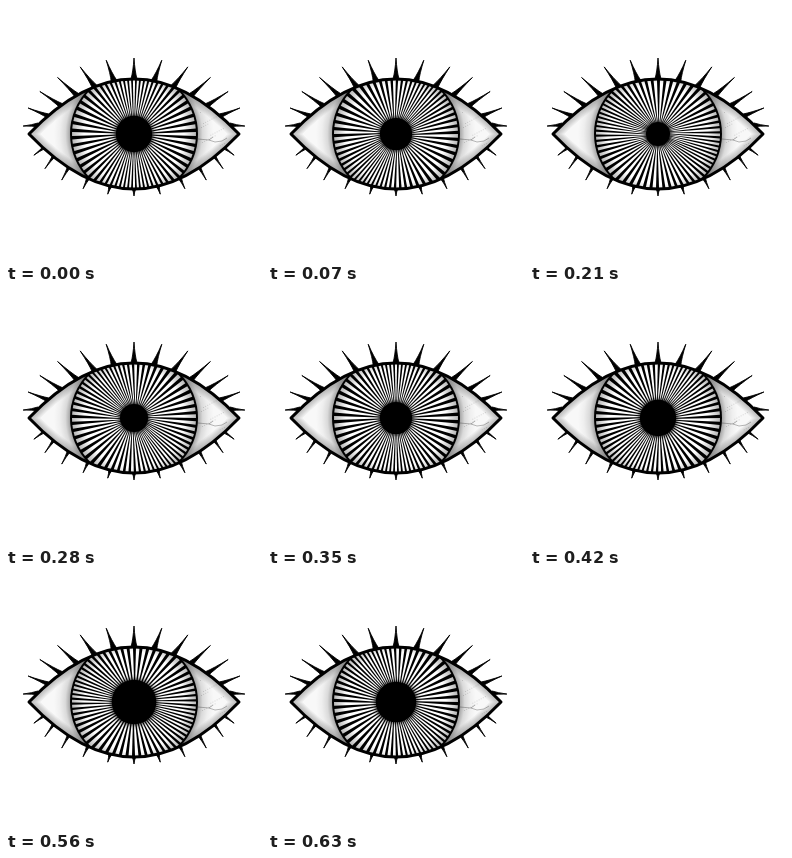
Write an HTML page with a canvas that moves like this. It is 256x256 px and loops after 700 ms.

```html
<!DOCTYPE html>
<html lang="en">
<head>
<meta charset="utf-8">
<title>Eye</title>
<style>
  html, body { margin: 0; width: 100%; height: 100%; overflow: hidden; background: #fff; }
  canvas { display: block; }
</style>
</head>
<body>
<canvas id="stage" width="256" height="256"></canvas>
<script>
const ctx = document.getElementById('stage').getContext('2d');
const TAU = Math.PI * 2, DEG = TAU / 360, C = 128;
const STEP = 70, STEPS = 10;
const HALF_W = 105, HALF_H = 55;
const RAYS = 64, IRIS = 63, HUB = 9;

const lids = new Path2D('M23 128Q128 18 233 128Q128 238 23 128Z');
const vein = new Path2D('M192 133L203 134 209 136 216 135 221 132M203 134L207 131');

const lidHeight = x => HALF_H * (1 - (x / HALF_W) ** 2);

function disc(r, fill) {
  ctx.fillStyle = fill;
  ctx.beginPath();
  ctx.arc(C, C, r, 0, TAU);
  ctx.fill();
}

function radial(r0, r1, ...alphas) {
  const fade = ctx.createRadialGradient(C, C, r0, C, C, r1);
  alphas.forEach((a, i) => fade.addColorStop(i / (alphas.length - 1), `rgba(0,0,0,${a})`));
  return fade;
}

// A spike with a broad foot that narrows quickly
function spike(rx, ry, tx, ty, w) {
  const len = Math.hypot(tx - rx, ty - ry);
  const nx = (ry - ty) / len * w, ny = (tx - rx) / len * w;
  const mx = rx * .65 + tx * .35, my = ry * .65 + ty * .35;
  ctx.beginPath();
  ctx.moveTo(rx + nx, ry + ny);
  ctx.quadraticCurveTo(mx + nx * .3, my + ny * .3, tx, ty);
  ctx.quadraticCurveTo(mx - nx * .3, my - ny * .3, rx - nx, ry - ny);
  ctx.fill();
  ctx.stroke();
}

// Roots follow the lid, tips follow a wider ellipse; side is -1 above, 1 below
function lashRow(side, count, root, spread, tipW, tipH, width) {
  for (let k = -count; k <= count; k++) {
    const x = root * Math.sin(k * spread * DEG);
    spike(C + x, C + side * lidHeight(x),
      C + tipW * Math.sin(k * 14.5 * DEG), C + side * tipH * Math.cos(k * 14 * DEG),
      width * (1 - Math.abs(k) * .06));
  }
}

function drawLashes() {
  ctx.fillStyle = ctx.strokeStyle = '#000';
  ctx.lineWidth = .9;
  lashRow(-1, 6, 105, 11, 111, 76, 3);
  lashRow(1, 5, 95, 14.5, 105, 62, 1.7);
}

function drawWhite() {
  ctx.fillStyle = '#f8f8f8';
  ctx.fill(lids);
  ctx.fillStyle = radial(IRIS, 80, .38, .12, .04, 0);
  ctx.fill(lids);
  ctx.strokeStyle = 'rgba(0,0,0,.04)';
  for (let w = 4; w <= 16; w += 2) {
    ctx.lineWidth = w;
    ctx.stroke(lids);
  }
  ctx.strokeStyle = 'rgba(0,0,0,.35)';
  ctx.lineWidth = .8;
  ctx.stroke(vein);
  ctx.fillStyle = 'rgba(0,0,0,.14)';
  for (let i = 0; i < 32; i++) {
    ctx.fillRect(194 + i * 7.3 % 24, 106 + i * 11.7 % 34, 1, 1);
  }
}

function drawIris(turn) {
  disc(IRIS + 1, '#000');
  ctx.save();
  ctx.translate(C, C);
  ctx.rotate(turn);
  ctx.fillStyle = '#fff';
  // Rays leave the hub evenly and fan out wider towards one axis
  const fan = a => a + .13 * Math.sin(2 * a);
  const point = (r, a) => ctx.lineTo(r * Math.cos(a), r * Math.sin(a));
  const half = TAU / RAYS * .27;
  for (let i = 0; i < RAYS; i++) {
    const a = TAU * i / RAYS;
    ctx.beginPath();
    point(HUB, a - half);
    point(IRIS - 1, fan(a - half));
    point(IRIS - 1, fan(a + half));
    point(HUB, a + half);
    ctx.fill();
  }
  ctx.restore();
  disc(IRIS, radial(50, IRIS, 0, .3));
}

function draw(now) {
  const step = Math.floor(now / STEP) % STEPS;
  // Pupil is smallest at step 3 and widest at step 8
  const pupil = 12 + 2.05 * Math.abs((step + 2) % STEPS - 5);

  ctx.fillStyle = '#fff';
  ctx.fillRect(0, 0, 256, 256);
  drawLashes();

  ctx.save();
  ctx.clip(lids);
  drawWhite();
  drawIris(TAU * step / STEPS);
  disc(pupil + 6, radial(pupil, pupil + 6, .6, .15, 0));
  disc(pupil, '#000');
  ctx.restore();

  ctx.strokeStyle = '#000';
  ctx.lineWidth = 3;
  ctx.lineJoin = 'round';
  ctx.stroke(lids);
}

function loop() {
  draw(performance.now());
  requestAnimationFrame(loop);
}
loop();
</script>
</body>
</html>
```
